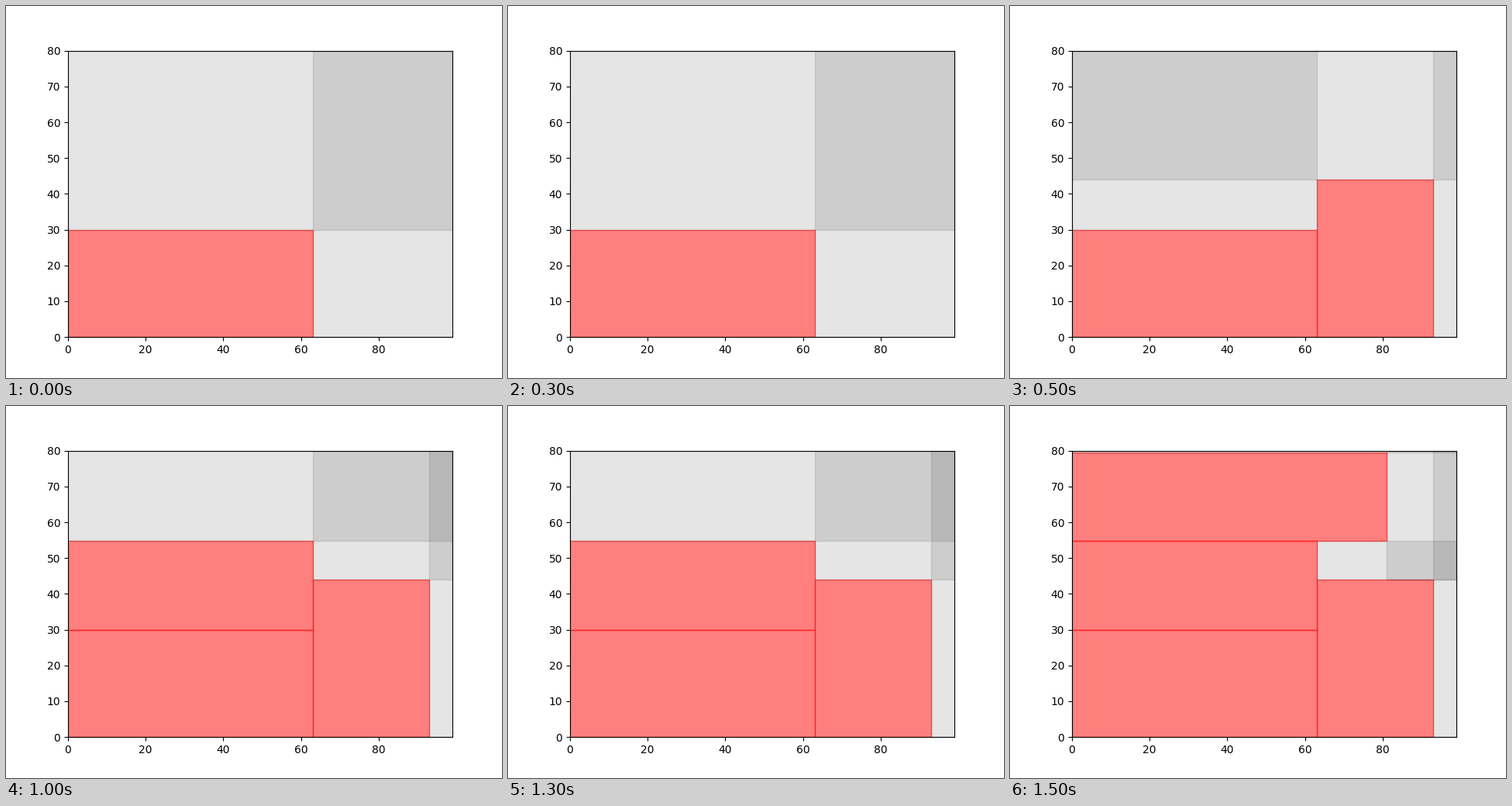
Write a matplotlib script that moves like this. It is 640 by 480 pixels and loops after 2000 ms.

```python
import matplotlib.pyplot as plt
from matplotlib.animation import FuncAnimation
from matplotlib.patches import Rectangle

BIN_W, BIN_H = 99, 80

# Packed items as (x, y, width, height), in order of placement
ITEMS = [
    (0, 0, 63, 30),
    (63, 0, 30, 44),
    (0, 30, 63, 24.75),
    (0, 54.75, 81, 24.75),
]


def overlaps(a, b):
    return (a[0] < b[0] + b[2] and b[0] < a[0] + a[2]
            and a[1] < b[1] + b[3] and b[1] < a[1] + a[3])


def contains(a, b):
    return (a[0] <= b[0] and a[1] <= b[1]
            and a[0] + a[2] >= b[0] + b[2]
            and a[1] + a[3] >= b[1] + b[3])


def split(free, item):
    """Return the maximal parts of a free rectangle around an item."""
    if not overlaps(free, item):
        return [free]
    x, y, w, h = free
    right, top = item[0] + item[2], item[1] + item[3]
    parts = [
        (x, y, item[0] - x, h),
        (right, y, x + w - right, h),
        (x, y, w, item[1] - y),
        (x, top, w, y + h - top),
    ]
    return [p for p in parts if p[2] > 0 and p[3] > 0]


def free_space(items):
    """Maximal free rectangles left once the items are packed."""
    free = [(0, 0, BIN_W, BIN_H)]
    for item in items:
        parts = list(dict.fromkeys(p for f in free for p in split(f, item)))
        free = [p for p in parts
                if not any(q != p and contains(q, p) for q in parts)]
    return free


fig, ax = plt.subplots(figsize=(6.4, 4.8), dpi=100)
ax.set_xlim(0, BIN_W)
ax.set_ylim(0, BIN_H)


def add_rects(rects, color, alpha):
    for x, y, w, h in rects:
        ax.add_patch(Rectangle((x, y), w, h, color=color, alpha=alpha))


def draw(step):
    for patch in list(ax.patches):
        patch.remove()
    packed = ITEMS[:step + 1]
    add_rects(packed, "red", 0.5)
    add_rects(free_space(packed), "black", 0.1)
    return ax.patches


anim = FuncAnimation(fig, draw, frames=len(ITEMS), interval=500, repeat=True)
plt.show()
```
